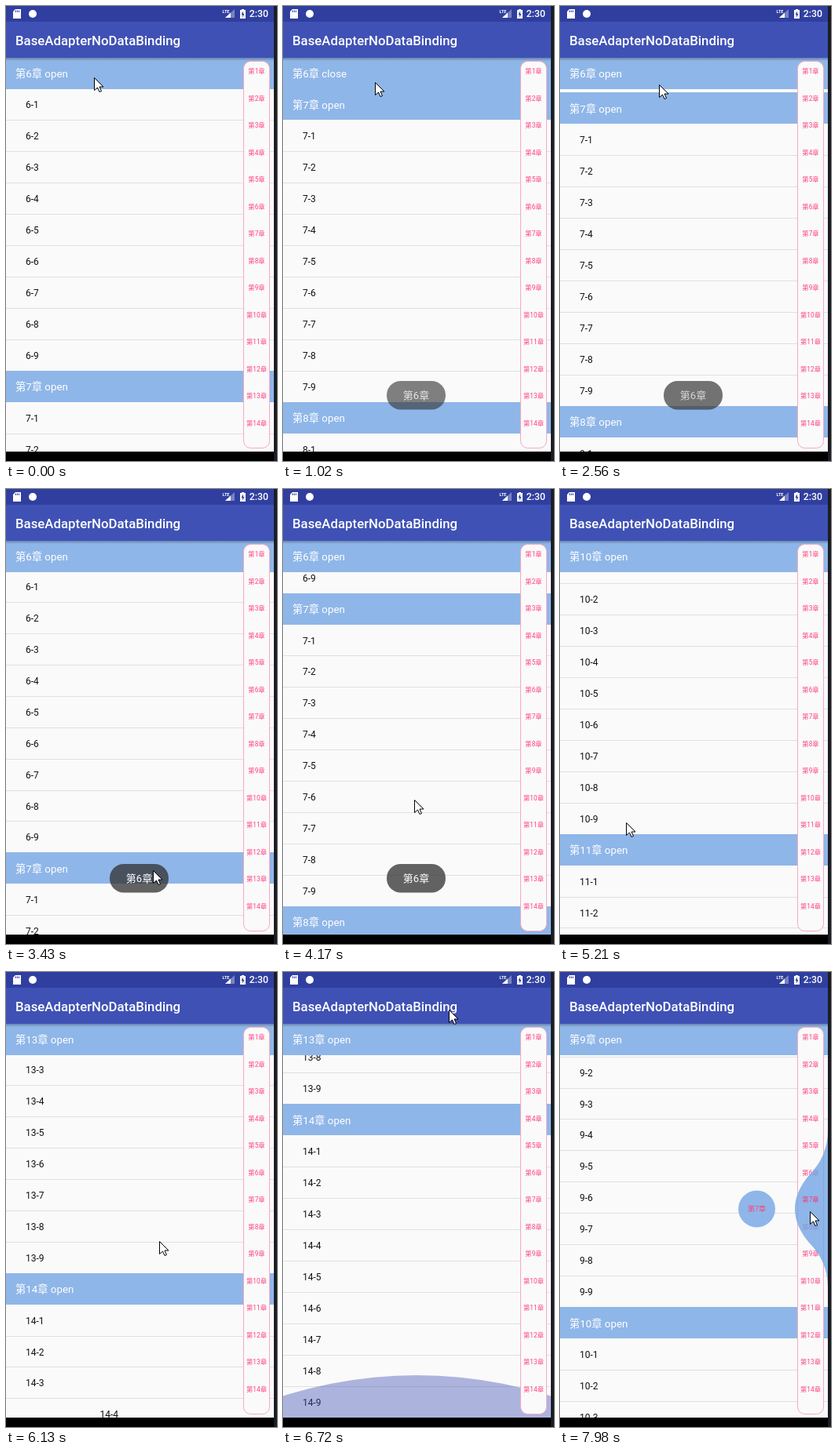
An HTML page with a canvas that plays this animation: 345 px wide and 580 px high, repeating every 8 s.

```html
<!DOCTYPE html>
<html lang="zh-CN">
<head>
<meta charset="utf-8">
<style>
  html, body { margin: 0; width: 100%; height: 100%; overflow: hidden; background: #000; }
  canvas { display: block; }
</style>
</head>
<body>
<canvas id="stage" width="345" height="580"></canvas>
<script>
const ctx = document.getElementById('stage').getContext('2d');
const FONT = 'Roboto, "Noto Sans CJK SC", "Noto Sans CJK", sans-serif';
const LOOP = 8000, W = 341, TOP = 66, BOTTOM = 568;
const ROW = 39.92, ITEMS = 9, GROUP = ROW * (ITEMS + 1);
const FIRST = 6, LAST = 14, MAX_SCROLL = (LAST - FIRST + 1) * GROUP - (BOTTOM - TOP);
const BLUE = '#8fb6e8', PINK = '#ff4081', PAPER = '#fafafa';

// Four equal swipes: drag up to `top`, let the list run to `scroll`, return to `rest`.
const SWIPE_START = 3400, SWIPE_PERIOD = 915, SETTLE = .84;
const swipes = [
  { top: [175, 67], rest: [167, 396], scroll: 332.1 },
  { top: [110, 61], rest: [84, 425], scroll: 1621.8 },
  { top: [150, 44], rest: [195, 343], scroll: 2875.4 },
  { top: [210, 46], rest: [318, 305], scroll: 3900 }
].map((swipe, i) => ({ ...swipe, start: SWIPE_START + i * SWIPE_PERIOD }));

const smooth = u => (1 - Math.cos(Math.PI * u)) / 2;
const cubic = u => u < .5 ? 4 * u ** 3 : 1 - 4 * (1 - u) ** 3;
const mix = (a, b, u) => a + (b - a) * u;
const ramp = (t, start, end) => Math.min(1, Math.max(0, (t - start) / (end - start)));

function pointerAt(t) {
  let point = [112, 91];
  const move = (to, start, end, ease = smooth) => {
    const u = ease(ramp(t, start, end));
    point = point.map((v, i) => mix(v, to[i], u));
  };
  move([120, 100], 560, 1320);
  move([124, 165], 1570, 1790);
  move([126, 100], 1790, 1950);
  move([187, 491], 2900, 3180);
  for (const { top, rest, start } of swipes) {
    move(top, start, start + .5 * SWIPE_PERIOD);
    move(rest, start + .6 * SWIPE_PERIOD, start + SETTLE * SWIPE_PERIOD, cubic);
  }
  return point.map(Math.round);
}

function scrollAt(t) {
  let scroll = 0;
  for (const swipe of swipes) {
    scroll = mix(scroll, swipe.scroll, smooth(ramp(t, swipe.start, swipe.start + SETTLE * SWIPE_PERIOD)));
  }
  return mix(Math.min(scroll, MAX_SCROLL), 1235.3, ramp(t, 7580, 7980));
}

function rect(x, y, w, h, color) {
  ctx.fillStyle = color;
  ctx.fillRect(x, y, w, h);
}

function text(str, x, y, size, color, align = 'left', weight = 400) {
  ctx.font = `${weight} ${size}px ${FONT}`;
  ctx.textAlign = align;
  ctx.fillStyle = color;
  ctx.fillText(str, x, y);
}

function polygon(points, color) {
  ctx.beginPath();
  points.forEach(([x, y]) => ctx.lineTo(x, y));
  ctx.closePath();
  ctx.fillStyle = color;
  ctx.fill();
}

function circle(x, y, r, color) {
  ctx.beginPath();
  ctx.arc(x, y, r, 0, Math.PI * 2);
  ctx.fillStyle = color;
  ctx.fill();
}

function roundBox(x, y, w, h, r, color) {
  ctx.beginPath();
  ctx.roundRect(x, y, w, h, r);
  ctx.fillStyle = color;
  ctx.fill();
}

function drawBars() {
  rect(0, 0, W, 20, '#303f9f');
  rect(0, 20, W, 46, '#3f51b5');
  text('BaseAdapterNoDataBinding', 12, 50, 16.8, '#fff', 'left', 500);
  // SD card, notification dot, signal, battery
  polygon([[12, 4], [19, 4], [19, 16], [9, 16], [9, 7]], '#fff');
  for (let x = 12; x <= 16; x += 2) rect(x, 5.5, 1, 2.5, '#303f9f');
  circle(34, 10, 5, '#fff');
  text('LTE', 275.5, 9, 5.5, '#fff', 'left', 700);
  polygon([[291, 4], [291, 15], [279, 15]], 'rgba(255,255,255,.35)');
  polygon([[286, 8.5], [286, 15], [279, 15]], '#fff');
  rect(298, 5, 7, 11, '#fff');
  rect(300, 4, 3, 1, '#fff');
  polygon([[302, 6.5], [299.5, 11], [301, 11], [301, 14.5], [303.5, 10], [302, 10]], '#303f9f');
  text('2:30', 334, 14, 12.3, '#fff', 'right', 500);
}

function drawHeader(n, y, open = true) {
  const top = Math.floor(y);
  rect(0, top, W, Math.floor(y + ROW + .1) - top, BLUE);
  text(`第${n}章 ${open ? 'open' : 'close'}`, 12, Math.round(y + 25), 13.3, '#fff');
}

function drawItems(n, y, height, t) {
  ctx.save();
  ctx.beginPath();
  ctx.rect(0, y, W, height);
  ctx.clip();
  for (let i = 1; i <= ITEMS; i++, y += ROW) {
    if (y > BOTTOM || y + ROW < TOP) continue;
    // This row first appears indented, then jumps into line.
    const indented = n === 14 && i === 4 && t < 6190;
    text(`${n}-${i}`, indented ? 119.5 : 25, Math.round(y + 24.5), 12, '#111');
    rect(0, Math.floor(y + ROW), W, 1, '#e0e0e0');
  }
  ctx.restore();
}

function drawList(t) {
  const opened = 1 - smooth(ramp(t, 560, 930)) + smooth(ramp(t, 2540, 2820));
  const firstOpen = t < 460 || t >= 2350;
  let y = TOP - scrollAt(t), current = FIRST, next = BOTTOM;

  for (let n = FIRST; n <= LAST; n++) {
    const height = ROW * ITEMS * (n === FIRST ? opened : 1);
    const end = y + ROW + height;
    if (y <= TOP) {
      current = n;
      next = end;
    }
    if (y < BOTTOM && end > TOP) {
      drawItems(n, y + ROW, height, t);
      drawHeader(n, y, n !== FIRST || firstOpen);
    }
    y = end;
  }
  drawHeader(current, Math.min(TOP, next - ROW), current !== FIRST || firstOpen);

  const shadow = ctx.createLinearGradient(0, TOP, 0, TOP + 4);
  shadow.addColorStop(0, 'rgba(0,0,0,.28)');
  shadow.addColorStop(1, 'rgba(0,0,0,0)');
  rect(0, TOP, W, 4, shadow);
}

function drawGlow(t) {
  const level = smooth(ramp(t, 6300, 6600)) - smooth(ramp(t, 6780, 7170));
  const radius = 560;
  if (level > 0) circle(W / 2, BOTTOM - 54 * level + radius, radius, `rgba(63,81,181,${.42 * level})`);
}

function indexLabel(n) {
  text(`第${n}章`, 319, 86 + (n - 1) * 34.5, 8.3, PINK, 'center');
}

function drawIndex() {
  roundBox(302.5, 70.5, 33, 493, 9, PAPER);
  ctx.lineWidth = 1;
  ctx.strokeStyle = '#f7a8c4';
  ctx.stroke();
  for (let n = 1; n <= 14; n++) indexLabel(n);
}

function drawWave(t) {
  const ratio = smooth(ramp(t, 7580, 7910));
  if (ratio <= 0) return;
  const r = 33.5, ball = 23.5, cy = 302;
  const sideX = W - r * Math.SQRT1_2 * ratio, sideY = r * (2 - Math.SQRT1_2);
  ctx.beginPath();
  ctx.moveTo(W, cy - 3 * r);
  ctx.quadraticCurveTo(W, cy - 2 * r, sideX, cy - sideY);
  ctx.quadraticCurveTo(W - 1.8 * r * ratio, cy, sideX, cy + sideY);
  ctx.quadraticCurveTo(W, cy + 2 * r, W, cy + 3 * r);
  ctx.fillStyle = 'rgba(116,166,229,.8)';
  ctx.fill();
  const ballX = W + ball - 2 * (r + ball) * ratio;
  circle(ballX, cy, ball, BLUE);
  indexLabel(7);
  if (ratio >= .9) text('第7章', ballX, cy + 3.2, 9, PINK, 'center');
}

function drawToast(t, shown, hidden) {
  ctx.globalAlpha = ramp(t, shown, shown + 400) - ramp(t, hidden, hidden + 500);
  roundBox(132, 478, 75, 36.5, 18, 'rgba(50,50,50,.76)');
  text('第6章', 169.5, 501, 13, '#fff', 'center');
  ctx.globalAlpha = 1;
}

function drawPointer(t) {
  const [x, y] = pointerAt(t);
  const shape = [[0, 0], [0, 16], [4, 12.5], [6.5, 18], [9, 17], [6.5, 11.5], [11.5, 11.5]];
  polygon(shape.map(([dx, dy]) => [x + .5 + dx, y + .5 + dy]), '#fff');
  ctx.lineWidth = 1;
  ctx.strokeStyle = '#000';
  ctx.stroke();
}

function draw(t) {
  rect(0, 0, 345, 580, '#000');
  rect(W, 0, 4, 580, '#1b1d23');
  ctx.save();
  ctx.beginPath();
  ctx.rect(0, 0, W, BOTTOM);
  ctx.clip();
  rect(0, TOP, W, BOTTOM - TOP, PAPER);
  drawList(t);
  drawGlow(t);
  drawIndex();
  drawWave(t);
  // The second toast fades in as the first fades out.
  drawToast(t, 700, 2300);
  drawToast(t, 2300, 4350);
  drawBars();
  ctx.restore();
  drawPointer(t);
}

function frame() {
  draw(performance.now() % LOOP);
  requestAnimationFrame(frame);
}
frame();
</script>
</body>
</html>
```
